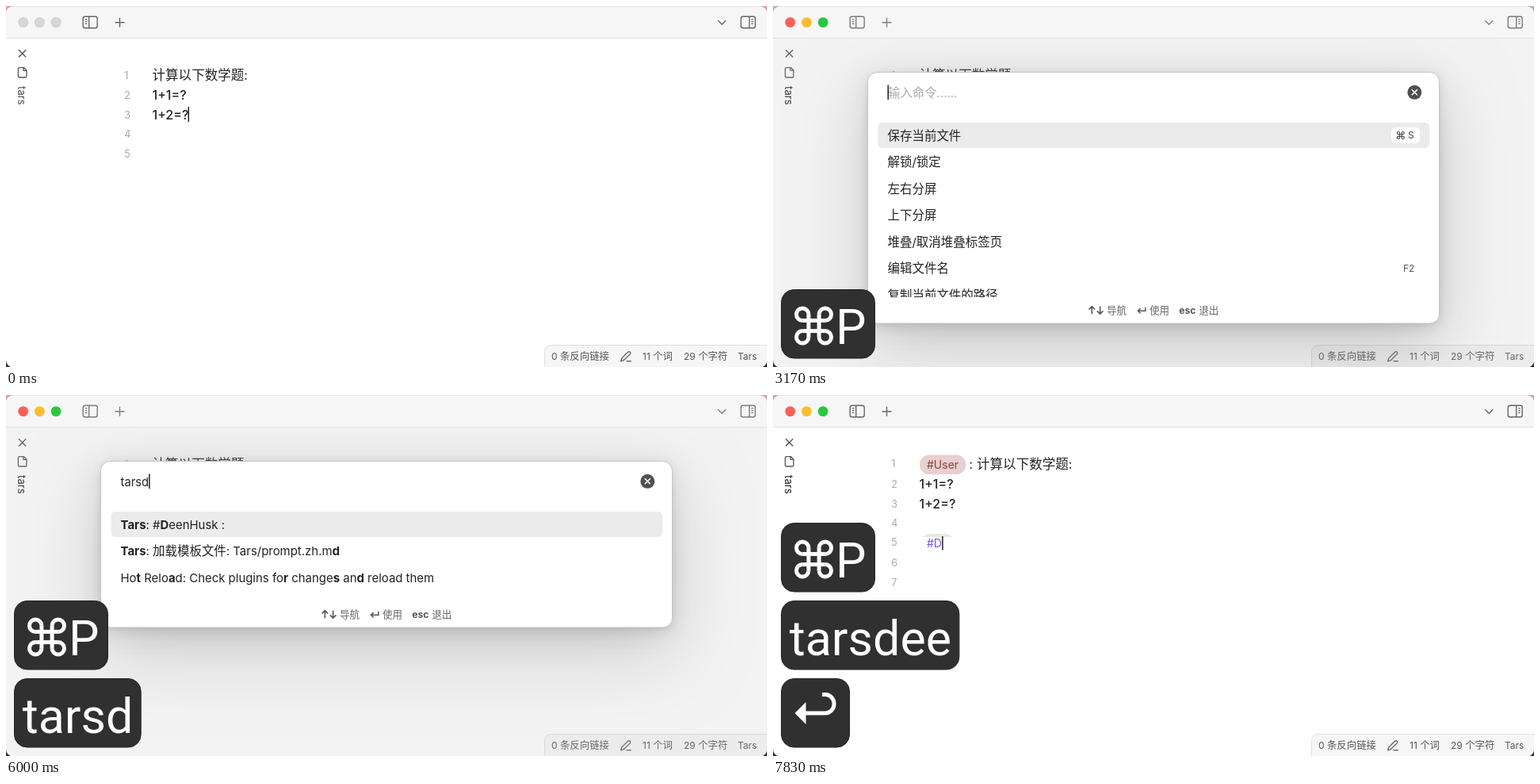
These frames come from a looping animation (960 px wide and 455 px high, 8000 ms). An HTML page with a canvas:

```html
<!DOCTYPE html>
<html lang="zh">
<head>
<meta charset="utf-8">
<title>Command palette</title>
<style>
html, body { margin: 0; width: 100%; height: 100%; overflow: hidden; background: #fff; }
canvas { display: block; width: 960px; height: 455px; }
</style>
</head>
<body>
<canvas id="stage" width="960" height="455"></canvas>
<script>
const ctx = document.getElementById('stage').getContext('2d');
const LOOP = 8000;
const SANS = 'Inter, "Noto Sans CJK SC", "Noto Sans CJK", sans-serif';
const HAN = '"Noto Sans CJK SC", "Noto Sans CJK", sans-serif';
const INK = '#222';

// When each query appears in the palette
const TYPING = [[4170, 't'], [4330, 'ta'], [5170, 'tar'], [5500, 'tars'],
  [6000, 'tarsd'], [6330, 'tarsde'], [6670, 'tarsdee']];
const OPEN = 3000, KEYS = 2830, ENTER = 7670, INSERT = 7830;

const COMMANDS = ['保存当前文件', '解锁/锁定', '左右分屏', '上下分屏',
  '堆叠/取消堆叠标签页', '编辑文件名', '复制当前文件的路径'];
const TARS = ['翻译', '#新对话', '#我 :', '提示词例子', '一句话总结', '#User :', '选择光标处的消息'];

function rows(q) {
  if (!q) return COMMANDS;
  if (q.length < 5) {
    const name = '*T' + q.slice(1) + '*' + 'Tars'.slice(q.length);
    return TARS.map(s => name + ': ' + s);
  }
  const d = 'Dee'.slice(0, q.length - 4);
  const top = '*Tars*: #*' + d + '*' + 'DeenHusk'.slice(d.length) + ' :';
  const reload = 'Ho*t* Relo*a*d: Check plugins fo*r* change*s* an*d* ';
  if (q === 'tarsd') return [top, '*Tars*: 加载模板文件: Tars/prompt.zh.m*d*', reload + 'reload them'];
  return [top, reload + 'r*e*load th' + (d === 'Dee' ? '*e*m' : 'em')];
}

// Draws text with *bold* parts; Han runs are set slightly larger. Returns the end x.
function text(s, x, y, size, color = INK, weight = 400) {
  ctx.fillStyle = color;
  ctx.textBaseline = 'alphabetic';
  s.split('*').forEach((part, i) => {
    for (const run of part.match(/[\u4e00-\u9fff]+|[^\u4e00-\u9fff]+/g) || []) {
      const han = run.charCodeAt(0) >= 0x4e00;
      ctx.font = `${i % 2 ? 700 : weight} ${han ? size * 1.035 : size}px ${han ? HAN : SANS}`;
      ctx.fillText(run, x, y + size * 0.36);
      x += ctx.measureText(run).width;
    }
  });
  return x;
}

function box(x, y, w, h, r, fill, stroke) {
  ctx.beginPath();
  ctx.roundRect(x, y, w, h, r);
  if (fill) { ctx.fillStyle = fill; ctx.fill(); }
  if (stroke) { ctx.strokeStyle = stroke; ctx.stroke(); }
}

function dot(x, y, r, fill) {
  ctx.beginPath();
  ctx.arc(x, y, r, 0, Math.PI * 2);
  ctx.fillStyle = fill;
  ctx.fill();
}

function line(d, color, width) {
  ctx.strokeStyle = color;
  ctx.lineWidth = width;
  ctx.stroke(new Path2D(d));
  ctx.lineWidth = 1;
}

// Looped-square command sign
function commandSign(x, y, half, width, color) {
  const r = (half - width / 2) * 0.35, a = (half - width / 2) - 2 * r;
  ctx.save();
  ctx.translate(x, y);
  ctx.strokeStyle = color;
  ctx.lineWidth = width;
  for (let i = 0; i < 4; i++) {
    ctx.beginPath();
    ctx.moveTo(a, -a - r);
    ctx.lineTo(a, a + r);
    ctx.stroke();
    ctx.beginPath();
    ctx.arc(a + r, a + r, r, -Math.PI / 2, Math.PI);
    ctx.stroke();
    ctx.rotate(Math.PI / 2);
  }
  ctx.restore();
}

// Full for half a second, half faded, then off until the next second
function caretAlpha(age) {
  const t = age % 1000;
  return t < 500 ? 1 : t < 650 ? 0.5 : 0;
}

function caret(x, y, h, alpha) {
  ctx.globalAlpha = alpha;
  ctx.fillStyle = '#111';
  ctx.fillRect(x, y, 1.4, h);
  ctx.globalAlpha = 1;
}

function sidebarIcon(x, side, color) {
  ctx.lineWidth = 1.4;
  box(x, 13.2, 18, 14.6, 2.5, null, color);
  const bar = side < 0 ? x + 7.5 : x + 10.5;
  const tick = side < 0 ? x + 2.8 : x + 13;
  line(`M${bar} 13.2V27.8`, color, 1.4);
  line(`M${tick} 16.8h2.4M${tick} 19.6h2.4M${tick} 22.4h2.4`, color, 1.2);
}

function frame(active, dim) {
  const bg = ctx.createLinearGradient(0, 0, 0, 455);
  bg.addColorStop(0, '#cfa9b0');
  bg.addColorStop(0.5, '#a09098');
  bg.addColorStop(1, '#333');
  ctx.fillStyle = bg;
  ctx.fillRect(0, 0, 960, 455);

  ctx.save();
  ctx.beginPath();
  ctx.roundRect(0, 0.5, 960, 455, 9);
  ctx.clip();
  ctx.fillStyle = '#fff';
  ctx.fillRect(0, 0, 960, 455);
  ctx.fillStyle = '#f6f6f6';
  ctx.fillRect(0, 0, 960, 41);
  ctx.fillStyle = '#e0e0e0';
  ctx.fillRect(0, 40, 960, 1);
  box(679.5, 427.5, 290, 40, 8, '#f6f6f6', '#dedede');
  ctx.restore();

  const lights = active ? ['#fe5f57', '#febc2e', '#28c840'] : ['#d7d7d7', '#d7d7d7', '#d7d7d7'];
  lights.forEach((c, i) => {
    dot(21.7 + i * 20.7, 20.6, 6.4, active ? c : '#c9c9c9');
    if (!active) dot(21.7 + i * 20.7, 20.6, 5.7, c);
  });

  const icon = dim ? '#7c7c7c' : '#666';
  sidebarIcon(97.2, -1, icon);
  sidebarIcon(927.2, 1, icon);
  line('M137.5 20.7h12M143.5 14.7v12', icon, 1.4);
  line('M898.3 18.2l4.9 5 4.9-5', icon, 1.4);

  line('M16 55.3l9.2 9.2M25.2 55.3l-9.2 9.2', '#555', 1.4);
  line('M17 77.6h5.5l3.4 3.4v7.4q0 1.6-1.6 1.6h-7.3q-1.6 0-1.6-1.6v-9.2q0-1.6 1.6-1.6zM22 77.8v3.6h3.8', '#555', 1.3);
  ctx.save();
  ctx.translate(19.5, 101);
  ctx.rotate(Math.PI / 2);
  text('tars', 0, 0, 13.2, active ? INK : '#505050');
  ctx.restore();

  const gray = '#555';
  text('0 条反向链接', 688, 442, 12, gray);
  line('M775.8 447.6l.8-3.4 8.2-8.2q1.3-1 2.5.2t.1 2.5l-8.2 8.1zM782.5 447.6h6.3', gray, 1.2);
  text('11 个词', 803, 442, 12, gray);
  text('29 个字符', 855, 442, 12, gray);
  text('Tars', 923, 442, 12, gray);
}

function lineNumbers(ys) {
  ys.forEach((y, i) => text(String(i + 1), 149.3, y, 12.6, '#a8a8a8'));
}

function editor(t) {
  if (t >= INSERT) {
    lineNumbers([86, 112, 137, 161, 185, 211, 236]);
    box(185, 75.5, 58.5, 24.5, 12.2, '#e8d0d0');
    text('#User', 194, 88, 14, '#8c403a');
    text(': ', 247.5, 87.5, 16);
    text('计算以下数学题:', 257, 87.5, 16);
    ctx.save();
    ctx.beginPath();
    ctx.rect(189, 174, 37, 5);
    ctx.clip();
    box(186, 175, 43, 24, 12, '#e9e9e9');
    ctx.restore();
    text('#D', 194, 187, 14, '#7c50e6');
    caret(213.2, 178, 17.5, 1);
  } else {
    lineNumbers([87, 112, 137, 161, 186]);
    text('计算以下数学题:', 184.5, 87.5, 16);
  }
  text('1+1=?', 184.5, 112.3, 16, INK, 500);
  text('1+2=?', 184.5, 137, 16, INK, 500);
  if (t < OPEN) caret(229.6, 127, 19, t < 2500 ? caretAlpha(t) : 0.5);
}

function shadow(y, blur, alpha, h) {
  ctx.shadowColor = `rgba(0,0,0,${alpha})`;
  ctx.shadowOffsetY = y;
  ctx.shadowBlur = blur;
  box(119.5, 83.5, 721, h, 12, '#fff');
}

function footer(y) {
  const c = '#555';
  line(`M402.3 ${y + 4.5}v-9.5m-3.8 3.8l3.8-3.8 3.8 3.8M412.6 ${y - 5}v9.5m-3.8-3.8l3.8 3.8 3.8-3.8`, c, 1.6);
  line(`M469.8 ${y - 4}v4.6h-9.4m3.2-3.2l-3.2 3.2 3.2 3.2`, c, 1.5);
  text('导航', 421, y, 12.1, '#666');
  text('使用', 475, y, 12.1, '#666');
  text('*esc*', 512.3, y, 12.1, c);
  text('退出', 537.3, y, 12.1, '#666');
}

function palette(query, since, t) {
  const list = rows(query);
  const bottom = list.length > 6 ? 400 : 192.5 + list.length * 33.5;
  const h = bottom - 83.5;

  ctx.save();
  ctx.beginPath();
  ctx.roundRect(0, 41, 960, 414, [0, 0, 9, 9]);
  ctx.clip();
  ctx.fillStyle = 'rgba(190,190,190,0.18)';
  ctx.fillRect(0, 41, 960, 414);
  shadow(30, 90, 0.17, h);
  shadow(6.3, 24.7, 0.112, h);
  shadow(1.8, 7.3, 0.071, h);
  ctx.restore();
  box(119.5, 83.5, 721, h, 12, '#fff', '#c4c4c4');

  let end = 144.5;
  if (query) end = text(query, end, 109.3, 14.8);
  else text('输入命令......', 145, 109.3, 14.9, '#ababab');
  caret(end, 99.5, 18.5, caretAlpha(t - since));
  dot(809.3, 108.8, 9, '#505050');
  line('M805.8 105.3l7 7M812.8 105.3l-7 7', '#fff', 1.6);

  box(132.5, 147, 695.5, 32, 5, '#ebebeb');
  ctx.save();
  ctx.beginPath();
  ctx.rect(120, 140, 720, Math.min(bottom, 367) - 140);
  ctx.clip();
  list.forEach((s, i) => text(s, 144.5, 163.3 + i * 33.5, 14.95));
  ctx.restore();
  if (!query) {
    box(780, 153, 36, 20, 5, '#fff');
    commandSign(791.8, 163, 5, 1.1, '#444');
    text('S', 801, 163, 12, '#444');
    text('F2', 795, 330.8, 12, '#555');
  }
  footer(bottom - 16.3);
}

function keyBox(slot, w) {
  const y = 357 - slot * 98;
  box(10.5, y + 0.5, w, 86.5, 16, '#303030', '#242424');
  return y;
}

function keyText(s, x, y) {
  ctx.fillStyle = '#fff';
  ctx.fillText(s, x, y + 69);
}

function keys(t, query) {
  const stack = ['cmd'];
  if (query) stack.push(query);
  if (t >= ENTER) stack.push('enter');
  ctx.font = '400 61px Roboto, sans-serif';
  stack.reverse().forEach((k, slot) => {
    if (k === 'cmd') {
      const y = keyBox(slot, 118);
      commandSign(51.5, y + 46, 24.5, 5, '#fff');
      keyText('P', 79, y);
    } else if (k === 'enter') {
      const y = keyBox(slot, 86);
      line(`M62 ${y + 20.5}h4a11 11.7 0 0 1 0 23.5h-27`, '#fff', 5);
      ctx.fillStyle = '#fff';
      ctx.fill(new Path2D(`M27.5 ${y + 44}l14-14v28z`));
    } else {
      const y = keyBox(slot, ctx.measureText(k).width + 20);
      keyText(k, 20.7, y);
    }
  });
}

function draw(t) {
  let query = '', since = OPEN;
  for (const [at, s] of TYPING) if (t >= at) { query = s; since = at; }
  const open = t >= OPEN && t < ENTER;
  frame(t >= 1500, open);
  editor(t);
  if (open) palette(query, since, t);
  if (t >= KEYS) keys(t, query);
}

const start = performance.now();
function tick() {
  draw((performance.now() - start) % LOOP);
  requestAnimationFrame(tick);
}
tick();
</script>
</body>
</html>
```
